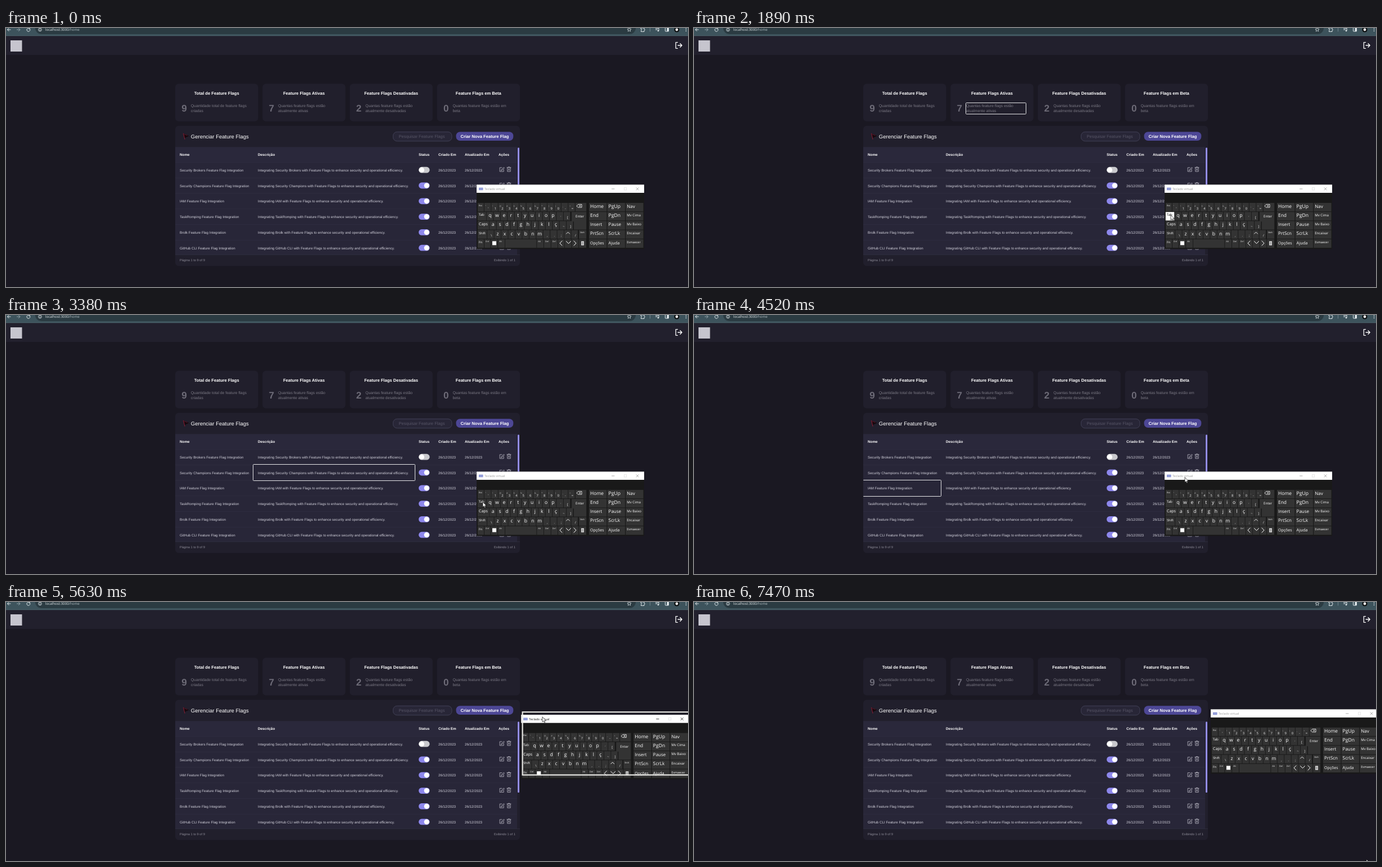
Recreate the animation shown at these times as an HTML page. Size 1213 px wide and 462 px high, loop 7490 ms.

```html
<!DOCTYPE html>
<html lang="pt-BR">
<head>
<meta charset="utf-8">
<title>Gerenciar Feature Flags</title>
<style>
html, body { margin: 0; width: 100%; height: 100%; overflow: hidden; background: #1a1822; }
svg { display: block; width: 1213px; height: 462px; }
text { font-family: "Liberation Sans", Arial, sans-serif; text-rendering: geometricPrecision; white-space: pre; }
.ui text { font-family: "Open Sans", "Noto Sans", sans-serif; }
.b { font-weight: 700; }
.m { text-anchor: middle; }
.line { fill: none; stroke-linecap: round; stroke-linejoin: round; }
</style>
</head>
<body>
<svg id="stage" viewBox="0 0 1213 462" xmlns="http://www.w3.org/2000/svg"></svg>
<script>
const LOOP = 7490;
const svg = document.getElementById('stage');

const rect = (x, y, w, h, fill, r = 0, more = '') =>
  `<rect x="${x}" y="${y}" width="${w}" height="${h}" rx="${r}" fill="${fill}" ${more}/>`;
const text = (x, y, size, fill, str, cls = '') =>
  `<text x="${x}" y="${y}" font-size="${size}" fill="${fill}" class="${cls}">${str}</text>`;
const line = (d, color, w = 1) =>
  `<path class="line" d="${d}" stroke="${color}" stroke-width="${w}"/>`;
const dot = (x, y, r, fill, more = '') => `<circle cx="${x}" cy="${y}" r="${r}" fill="${fill}" ${more}/>`;

// ---- browser bar and page header
function browserBar() {
  const c = '#dfe6e9';
  return '<g class="ui">' + rect(0, 0, 1213, 14, '#3d535c') + rect(52, -12, 1068, 23, '#2b3b42', 11) +
    line('M8 3H2.5M5 .5L2.5 3L5 5.5', c) + line('M19.5 3H25M22.5 .5L25 3L22.5 5.5', '#8fa0a7') +
    line('M42 1A3 3 0 1 1 39.5 .2M42 -1V1.2H40', c) +
    dot(60.5, 3, 2.8, 'none', `stroke="${c}" stroke-width=".9"`) + line('M60.5 3V4.4M60.5 1.5V1.6', c, .9) +
    text(70, 5.2, 6.2, '#e6ebed', 'localhost:3000<tspan fill="#b4c0c5">/home</tspan>') +
    line('M1108.5 -.8L1109.6 1.6L1112 1.9L1110.2 3.5L1110.7 6L1108.5 4.7L1106.3 6L1106.8 3.5L1105 1.9L1107.4 1.6Z', c, .8) +
    line('M1129.5 0H1135V2A1.2 1.2 0 0 1 1135 4.4V6.5H1129.5V4.4A1.2 1.2 0 0 0 1129.5 2Z', c) +
    line('M1145.5 0V6', '#7d9098', .8) +
    line('M1155.5 .8H1161M1155.5 3H1158.5M1161 .8V4.6', c) + dot(1160, 5, 1.3, c) +
    rect(1172.5, -1, 6, 7, 'none', .5, `stroke="${c}"`) + rect(1175.5, -1, 3, 7, c) +
    dot(1193, 3, 4.6, '#0c0f10') + dot(1193, 3, 2.4, '#f2f2f2') +
    dot(1209.5, .5, .8, c) + dot(1209.5, 3, .8, c) + dot(1209.5, 5.5, .8, c) + '</g>';
}

function pageHeader() {
  return rect(0, 14, 1213, 34, '#22202d') + rect(0, 13.4, 1213, .8, '#526a73') +
    rect(8, 22, 20.5, 20, '#c6c5ce') +
    line('M1194.5 25.7H1191.3V36.3H1194.5M1195 31H1202M1199 27.8L1202.2 31L1199 34.2', '#fff', 1.3);
}

// ---- summary cards
const CARDS = [
  ['Total de Feature Flags', 9, 'Quantidade total de feature flags', 'criadas'],
  ['Feature Flags Ativas', 7, 'Quantas feature flags estão', 'atualmente ativas'],
  ['Feature Flags Desativadas', 2, 'Quantas feature flags estão', 'atualmente desativadas'],
  ['Feature Flags em Beta', 0, 'Quantas feature flags estão em', 'beta']
];
const STEP = 155.2;
const card = ([title, n, a, b], i) => {
  const x = 301 + i * STEP;
  return rect(x, 99.5, 147.5, 67, '#211f2c', 6) +
    text(x + 73.7, 118.9, 7.6, '#fff', title, 'b m') +
    text(x + 11.3, 148.6, 17, '#6d6b77', n, 'b') +
    text(x + 27.8, 140.6, 6.84, '#7b7984', a) + text(x + 27.8, 150.1, 6.84, '#7b7984', b);
};

// ---- table
const NAMES = ['Security Brokers', 'Security Champions', 'IAM', 'TaskRomping', 'Brolk', 'GitHub CLI'];
const COLS = [['Nome', 309], ['Descrição', 448], ['Status', 734], ['Criado Em', 769], ['Atualizado Em', 816], ['Ações', 876]];
const ROW = 27.8;

function row(name, i) {
  const y = 253.5 + i * ROW, on = i > 0, c = '#d3d2dc', t = y + 2.3;
  return (i < 5 ? rect(301, y + 13.4, 608, .6, '#323043') : '') +
    text(309, t, 6.21, c, name + ' Feature Flag Integration') +
    text(448, t, 6.21, c, `Integrating ${name} with Feature Flags to enhance security and operational efficiency.`) +
    rect(734, y - 5.7, 19.5, 10.8, on ? '#8d87ec' : '#c9c9cd', 5.4) + dot(on ? 748.2 : 739.3, y - .3, 4.6, '#fff') +
    text(769, t, 6.21, c, '26/12/2023') + text(816, t, 6.21, c, '26/12/2023') +
    `<g transform="translate(0 ${y})">` +
    line('M882 -4.5H878.2V2.5H885.2V-1M881 -.6L885.3 -5L886.5 -3.9L882.2 .4L880.7 .7Z', c, .7) +
    line('M891 -4.6H898M893.3 -4.8V-5.6H895.7V-4.8M891.8 -4.5V2.5H897.2V-4.5M893.5 -2.5L895.5 .5M895.5 -2.5L893.5 .5', c, .7) +
    '</g>';
}

function panel() {
  return rect(301, 174.5, 613, 250, '#211f2c', 6) +
    '<path d="M316 188.5L325.5 192.5L317.5 196.5Z" fill="#17090f"/>' +
    line('M315.5 188.2L318 198.5', '#8c1c33', 1) + line('M317 189.5L322 191.5', '#6f1a2c', .8) +
    text(328.8, 196.7, 9.5, '#fff', 'Gerenciar Feature Flags') +
    rect(688.5, 185.3, 104.5, 16.5, '#282637', 7, 'stroke="#45435a" stroke-width=".9"') +
    text(698.5, 196.2, 7.54, '#575566', 'Pesquisar Feature Flags') +
    rect(800.5, 185.3, 101.8, 15.8, '#4d4796', 7) + text(851.4, 195.6, 7.62, '#fff', 'Criar Nova Feature Flag', 'b m') +
    rect(301, 212.5, 608, 192, '#282638') + rect(301, 212.5, 608, 27.5, '#2a283b') +
    rect(301, 239.7, 608, .6, '#323043') +
    COLS.map(([s, x]) => text(x, 228.2, 6.33, '#fff', s, 'b')).join('') +
    `<g clip-path="url(#table)">${NAMES.map(row).join('')}</g>` +
    rect(301, 404.2, 613, .6, '#343244') + rect(910, 213.5, 3, 126.5, '#928cee', 1) +
    text(309, 416.2, 5.73, '#8d8b97', 'Página 1 to 9 of 9') + text(868, 416.2, 5.73, '#8d8b97', 'Exibindo 1 of 1');
}

// ---- on-screen keyboard
const KEY = '#333', PITCH = 12.45, SHIFTED = '"!@#$%¨&*()_+';
const esc = c => c === '&' ? '&amp;' : c;
const top4 = r => 312 + r * 16.2;
const key = (x, r, w) => rect(x, top4(r), w, 15.2, KEY);
const cap = (x, r, w, s, size, dy = 7.6) => key(x, r, w) + text(x + 2, top4(r) + dy, size, '#fff', s);

function run(x, r, chars) {
  return [...chars].map((c, i) => {
    const k = x + i * PITCH, y = top4(r);
    const shift = r ? '' : text(k + 1.8, y + 6.5, 4, '#a5a5a5', esc(SHIFTED[i]));
    const label = c === '^' ? line(`M${k + 3.5} ${y + 6.5}l3 -3l3 3`, '#fff', .9)
      : /[a-zç]/.test(c) ? text(k + 6, y + 9, 8.6, '#fff', c, 'm')
      : text(k + 7.2, y + 11.5, 5.8, '#eee', c, 'm');
    return key(k, r, PITCH - .9) + shift + label;
  }).join('');
}

// label, size, baseline
const SIDE = [
  [['Home', 8.5, 8.8], ['PgUp', 8.6, 8.8], ['Nav', 8, 8.8]],
  [['End', 8.4, 8.8], ['PgDn', 8.6, 8.8], ['Mv Cima', 6.1, 7.3]],
  [['Insert', 7.9, 8.8], ['Pause', 8, 8.8], ['Mv Baixo', 6.1, 7.3]],
  [['PrtScn', 8, 8.8], ['ScrLk', 8.3, 8.8], ['Encaixar', 6.1, 7.3]],
  [['Opções', 7, 9.2], ['Ajuda', 7.4, 9.6], ['Esmaecer', 5.4, 7]]
];

function keyboard() {
  const side = SIDE.map((keys, r) => keys.map((k, c) => cap(1037 + c * 32.6, r, 31.4, ...k)).join('')).join('');
  const bottom = [[851, 10.5, 'Ctrl'], [862.4, 11.8, ''], [875.2, 11.9, 'Alt'], [888, 55.4, ''], [944.3, 11.8, 'Alt'],
    [957, 11.8, 'Del'], [969.7, 11.4, 'Ctrl'], [982, 11.2, ''], [994, 11.5, ''], [1006.4, 11.8, ''], [1019.2, 12.8, '']]
    .map(([x, w, s]) => cap(x, 4, w, s, 3.7, 5.3)).join('');
  return '<g class="ui">' + rect(837, 279.4, 298, 115, '#191919') + rect(837, 279.4, 298, 14.6, '#fff') +
    rect(841, 284.8, 7.5, 4.4, '#7f8bd0', .5) + line('M842 286.2H847.5M842 287.8H847.5', '#c3c9f0', .5) +
    `<g id="bar">${text(851, 288.9, 5.4, 'currentColor', 'Teclado virtual')}` +
    line('M1077.5 287H1082M1121 284.8L1125.2 289M1125.2 284.8L1121 289', 'currentColor', .8) + '</g>' +
    rect(1099.5, 284.8, 4.2, 4.2, 'none', 0, 'stroke="#ddd" stroke-width=".7"') +
    cap(839, 0, 10.8, 'Esc', 4, 5.5) + run(850.8, 0, "'1234567890-=") + key(1012.8, 0, 19.4) +
    line('M1015 317.3L1018 314.6H1024V320H1018ZM1019.5 316L1022 318.6M1022 316L1019.5 318.6', '#fff', .8) +
    `<g id="tab">${cap(838.8, 1, 15.4, 'Tab', 6, 7.2)}</g>` + run(854.9, 1, 'qwertyuiop´[') +
    cap(839, 2, 20.4, 'Caps', 7) + run(860.1, 2, 'asdfghjklç~]') + key(1010, 2, 22.2) +
    rect(1006, 328.2, 26.2, 17, KEY) + text(1013, 338.4, 6.1, '#fff', 'Enter') +
    cap(839, 3, 16.2, 'Shift', 5.6, 7) + run(856.1, 3, '\\zxcvbnm,.;^/') + cap(1019, 3, 13.2, 'Shift', 3.7, 5.3) +
    cap(839, 4, 11, 'Fn', 5.4, 7) + bottom + rect(865, 380.3, 7, 7, '#fff') +
    line('M989 379.8L985 383.9L989 388M996.5 380.5L1000.5 384.5L1004.5 380.5M1010 379.8L1014 383.9L1010 388', '#fff', 1) +
    rect(1023, 380.5, 5, 7, '#eee') + line('M1024 382.5H1027M1024 384H1027M1024 385.5H1027', '#333', .6) +
    side + '</g>';
}

svg.innerHTML = `<defs><clipPath id="table">${rect(301, 212, 608.5, 192.5, '#000')}</clipPath></defs>` +
  rect(0, 0, 1213, 462, '#1a1822') + browserBar() + pageHeader() + CARDS.map(card).join('') + panel() +
  `<g id="clipper">${rect(0, 0, 0, 0, 'none', 1, 'id="ring" stroke="#e4e4e6"')}</g>` +
  `<g id="kb">${keyboard()}</g>` +
  rect(837.7, 280.2, 296.2, 112.2, 'none', 0, 'id="frame" stroke="#e8e8e4" stroke-width="2.2"') +
  '<path id="cursor" d="M0 0V9L2.1 7.2L3.6 10.4L5 9.8L3.6 6.7H6.4Z" fill="#fff" stroke="#111" stroke-width=".7"/>';

// ---- tab order: boxes [left, top, right, bottom] in whole pixels
const X = [300, 439, 727, 760, 808, 868, 909];
const stops = [];
[[334, 416], [492, 568], [636, 734], [798, 882]].forEach(([l, r], i) => {
  const c = Math.round(i * STEP);
  stops.push([l, 110, r, 122], [311 + c, 133, 323 + c, 153], [328 + c, 133, 435 + c, 153]);
});
stops.push([688, 184, 793, 202], [800, 184, 902, 201]);
for (let c = 0; c < 6; c++) stops.push([X[c], 212, X[c + 1], 240]);
for (let r = 0; r < 4; r++) {
  const y = Math.round(238.5 + r * ROW);
  const cell = c => [X[c], y, X[c + 1], y + 29];
  stops.push(cell(0), cell(1), [734, y + 9, 753, y + 20], cell(3), cell(4),
    [877, y + 8, 887, y + 18], [890, y + 8, 899, y + 18]);
}

// ---- bursts of presses: first release, spacing, count, first hold
const BURSTS = [[1100, 100, 1, 90], [1490, 95, 5, 60], [2050, 81, 9, 170], [2860, 39.5, 14, 80],
  [3640, 120, 6, 60], [5910, 100, 1, 50], [6060, 120, 2, 60], [6440, 125, 6, 190]];
const presses = BURSTS.flatMap(([t, gap, n, hold]) =>
  Array.from({ length: n }, (_, i) => [t + i * gap - (i ? gap / 2 : hold), t + i * gap]));

const POINTER = [[170, 1190, 441], [900, 855, 349], [1000, 848, 333.5], [4370, 848, 333.5], [4510, 873, 289.5], [4640, 873, 289.5],
  [5110, 919, 332], [5200, 922, 321.5], [5380, 922, 321.5], [5660, 955, 201], [5850, 931.7, 247], [7190, 931.7, 247], [7460, 1196, 459]];
const WINDOW = [[4640, 0, 0], [5110, 44.6, 43], [5380, 44.6, 43], [5680, 82, -88]];
const FRAME = [[4640, 0, 0], [5110, 44.6, 43], [5200, 48.5, 40], [5380, 48.5, 40], [5660, 82, -88]];

function at(path, t) {
  const i = path.findIndex(p => p[0] > t);
  if (i < 0) return path[path.length - 1].slice(1);
  if (!i) return path[0].slice(1);
  const [a, b] = [path[i - 1], path[i]];
  const u = (t - a[0]) / (b[0] - a[0]), e = u * u * (3 - 2 * u);
  return [a[1] + (b[1] - a[1]) * e, a[2] + (b[2] - a[2]) * e];
}

const el = id => document.getElementById(id);
const set = (node, o) => { for (const k in o) node.setAttribute(k, o[k]); };
const show = (node, on) => set(node, { visibility: on ? 'visible' : 'hidden' });
const move = (node, path, t) => set(node, { transform: `translate(${at(path, t).join(' ')})` });
const [ring, kb, frame, cursor, bar, clipper] = ['ring', 'kb', 'frame', 'cursor', 'bar', 'clipper'].map(el);
const [tabKey, tabText] = el('tab').children;

function draw(t) {
  const n = presses.filter(p => p[1] <= t).length - 1;
  const focused = n >= 0 && !(t >= 4600 && t < 5700) && t < 7420;
  show(ring, focused);
  if (focused) {
    const [l, top, r, b] = stops[n];
    set(ring, { x: l + .5, y: top + .5, width: r - l, height: b - top });
    set(clipper, { 'clip-path': n > 13 ? 'url(#table)' : 'none' });
  }
  const down = presses.some(p => t >= p[0] && t < p[1]);
  set(tabKey, { fill: down ? '#fff' : KEY });
  set(tabText, { fill: down ? '#111' : '#fff' });

  const drag = t >= 4640 && t < 5690;
  set(bar, { color: drag ? '#111' : '#999' });
  show(frame, drag);
  show(cursor, t >= 170);
  move(kb, WINDOW, t);
  move(frame, FRAME, t);
  move(cursor, POINTER, t);
}

let start;
function tick(now) {
  start ??= now;
  draw((now - start) % LOOP);
  requestAnimationFrame(tick);
}
draw(0);
requestAnimationFrame(tick);
</script>
</body>
</html>
```
